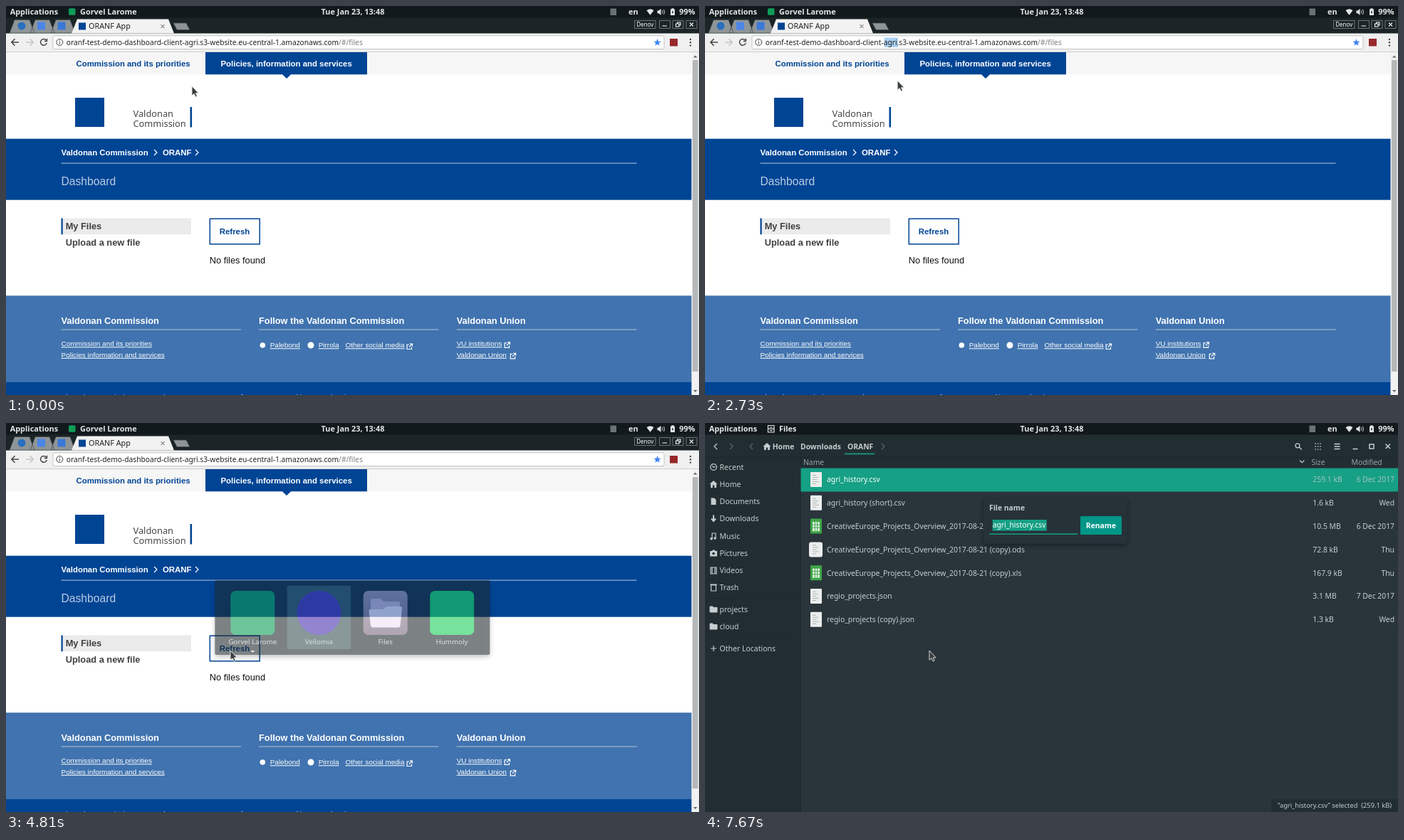
These frames come from a looping animation (973x547 px, 8 s). An HTML page:

```html
<!DOCTYPE html>
<html lang="en">
<head>
<meta charset="utf-8">
<title>Dashboard demo</title>
<style>
html, body { margin: 0; width: 100%; height: 100%; overflow: hidden; background: #29353b; }
svg { display: block; width: 973px; height: 547px; }
text { white-space: pre; }
.ui { font: 10.35px "Noto Sans", sans-serif; fill: #c6cdcf; }
.bold { font-weight: 700; }
.panel { font-size: 10.9px; font-weight: 700; fill: #e3e6e6; }
.web { font: 9.97px "Liberation Sans", Arial, sans-serif; fill: #fff; }
.nav { font-size: 11.4px; font-weight: 700; }
.head { font-size: 12.82px; font-weight: 700; }
.link { text-decoration: underline; }
.blue { fill: #004494; }
.line { fill: none; stroke-width: 1.2; }
.mid { text-anchor: middle; }
.end { text-anchor: end; }
</style>
</head>
<body>
<svg viewBox="0 0 973 547">
<defs>
  <linearGradient id="tile" x2="0" y2="1"><stop stop-color="#a08fa5"/><stop offset="1" stop-color="#7c6c80"/></linearGradient>
  <filter id="shadow" x="-10%" y="-20%" width="120%" height="150%"><feDropShadow dx="0" dy="3" stdDeviation="3.5" flood-opacity=".4"/></filter>
  <g id="out" class="line" stroke="#fff"><path d="M3.5 1.5H.6V8H7V5M4.5.6H8V4M8 .6L3.4 5"/></g>
  <path id="chevron" class="line" d="M0 0L4 4L0 8"/>
  <path id="folder" d="M0 1.5Q0 .5 1 .5H4L5.5 2H10Q11 2 11 3V8.5Q11 9.5 10 9.5H1Q0 9.5 0 8.5Z"/>
  <path id="house" d="M5.5 0L11 5H9.5V10H6.7V6.5H4.3V10H1.5V5H0Z"/>
</defs>

<g id="browser">
  <!-- page -->
  <rect width="973" height="547" fill="#fff"/>
  <g id="page" class="web">
    <rect x="-10" y="64.8" width="1000" height="31.5" fill="#f6f6f6"/>
    <path class="blue" d="M280 64.8H507V96.3H400L394 102L388 96.3H280Z"/>
    <text class="nav blue" x="98.5" y="84.8">Commission and its priorities</text>
    <text class="nav" x="301.5" y="84.8">Policies, information and services</text>
    <rect class="blue" x="97" y="129" width="41" height="41"/>
    <g style="font: 500 12.8px 'Noto Sans', sans-serif" fill="#454649">
      <text x="178.5" y="156">Valdonan</text><text x="178.5" y="169.8">Commission</text>
    </g>
    <rect x="258.5" y="142" width="2.6" height="28.5" class="blue"/>
    <rect class="blue" x="-10" y="186.7" width="1000" height="86"/>
    <text class="nav" x="77.5" y="210">Valdonan Commission</text>
    <text class="nav" x="220" y="210">ORANF</text>
    <g stroke="#fff" stroke-width="1.6"><use href="#chevron" x="208" y="202"/><use href="#chevron" x="266" y="202"/></g>
    <rect x="77.5" y="220.6" width="808" height="1" fill="#b3c7df"/>
    <text x="77.5" y="252" style="font-size: 15.67px" fill="#b9cbe2">Dashboard</text>
    <rect x="77.5" y="298.5" width="182.5" height="22.7" fill="#ebebeb"/>
    <rect class="blue" x="77.5" y="298.5" width="2.2" height="22.7"/>
    <g class="head" fill="#404040"><text x="83.7" y="314.3">My Files</text><text x="83.7" y="337">Upload a new file</text></g>
    <g id="result">
      <rect id="button" x="286.3" y="299.2" width="69.9" height="35.6"/>
      <text id="refresh" class="nav mid" x="321" y="321.3">Refresh</text>
      <text x="285.7" y="362.3" style="font-size: 12.82px" fill="#111">No files found</text>
    </g>
  </g>
  <g id="spinner" fill="none" stroke="#004494" stroke-width="1.6">
    <path d="M3.6 -4.8A6 6 0 1 1 -3.6 -4.8"/><path d="M-6.6 -5.6H-2.6V-1.6"/>
  </g>
  <g id="footer" class="web">
    <rect x="-10" y="407.3" width="1000" height="121.5" fill="#4073af"/>
    <rect x="-10" y="528.6" width="1000" height="60" class="blue"/>
    <g class="head">
      <text x="77.5" y="447.3">Valdonan Commission</text>
      <text x="355" y="447.3">Follow the Valdonan Commission</text>
      <text x="632.7" y="447.3">Valdonan Union</text>
    </g>
    <path d="M77.5 455H330M355 455H607.5M632.7 455H885.5" stroke="#b3c7df"/>
    <g class="link">
      <text x="77.5" y="478.3">Commission and its priorities</text>
      <text x="77.5" y="493.8">Policies information and services</text>
      <text x="370.7" y="480.3">Palebond</text>
      <text x="438.7" y="480.3">Pirrola</text>
      <text x="476.5" y="480.3">Other social media</text>
      <text x="632.7" y="478.3">VU institutions</text>
      <text x="632.7" y="493.8">Valdonan Union</text>
      <text x="77.5" y="552.8">About the Commission's new web presence</text>
      <text x="279.3" y="552.8">Resources for partners</text>
      <text x="389.5" y="552.8">Cookies</text>
      <text x="433.8" y="552.8">Legal notice</text>
      <text x="496.5" y="552.8">Contact</text>
    </g>
    <circle cx="360.3" cy="477" r="3.8"/><circle cx="428" cy="477" r="4.5"/>
    <use href="#out" x="562.5" y="474.5"/><use href="#out" x="699.5" y="472.3"/><use href="#out" x="707.7" y="487.8"/>
  </g>
  <g id="scrollbar">
    <rect x="962.5" y="65" width="10.5" height="482" fill="#f1f1f1"/>
    <rect x="964" y="76" width="7.6" height="438" fill="#b5b7b8"/>
    <path d="M965 72.5L967.8 69.5L970.6 72.5ZM965 540L967.8 543L970.6 540Z" fill="#666"/>
  </g>

  <!-- tabs and address bar -->
  <rect y="16" width="973" height="23" fill="#1b2427"/>
  <g fill="#8f9597" stroke="#40484b" stroke-width=".7">
    <path d="M5 38L12 19.5H33L40 38ZM34 38L41 19.5H61L68 38ZM63 38L70 19.5H90L97 38Z"/>
    <path d="M235 24H253L258 33.5H240Z"/>
  </g>
  <path d="M92 38.5L100 18.5H228L236 38.5Z" fill="#f2f2f2"/>
  <circle cx="22" cy="28" r="5.5" fill="#2a6fc0"/>
  <rect x="44" y="22.5" width="11" height="11" fill="#4a86e8"/>
  <rect x="72.5" y="22.5" width="11" height="11" fill="#3a78d8"/>
  <rect x="102" y="23.5" width="10" height="10" class="blue"/>
  <text class="ui" x="116" y="32.2" style="font-size: 10.8px; fill: #222">ORANF App</text>
  <path d="M217.5 26L222.5 31M222.5 26L217.5 31" stroke="#555"/>
  <rect y="38.5" width="973" height="26.3" fill="#f0f0f0"/>
  <rect y="64" width="973" height=".8" fill="#c8c8c8"/>
  <rect x="66" y="41.8" width="858" height="18.8" rx="2" fill="#fff" stroke="#b4b6b7" stroke-width=".8"/>
  <g class="line" stroke="#444" style="stroke-width: 1.5">
    <path d="M18 51H8M12.5 46.2L7.8 51L12.5 55.8"/>
    <path d="M28 51H38M33.5 46.2L38.2 51L33.5 55.8" stroke="#c3c5c6"/>
    <path d="M56.3 48A4.4 4.4 0 1 0 57.2 52M57.4 45.8V49.4H53.8"/>
    <path d="M75.3 50.3V53.8M75.3 48V49.2" stroke-width="1"/><circle cx="75.3" cy="51" r="4.5" stroke-width="1"/>
  </g>
  <rect id="mark" y="44.5" height="13.5" fill="#abd1f3"/>
  <text class="ui" x="84.7" y="54.8" style="font-size: 10.24px; fill: #222">oranf-test-demo-dashboard-client-agri.s3-website.eu-central-1.amazonaws.com<tspan fill="#808080">/#/files</tspan></text>
  <path id="star" fill="#4285f4"/>
  <rect x="932" y="46" width="11" height="10.5" fill="#97282a"/>
  <g fill="#444"><circle cx="961" cy="47" r="1.2"/><circle cx="961" cy="51.3" r="1.2"/><circle cx="961" cy="55.6" r="1.2"/></g>
  <g class="line" stroke="#858b8d" style="stroke-width: .8">
    <path d="M882.5 20.5H912V31.5H882.5ZM917.5 20.5H932.5V31.5H917.5ZM936 20.5H951V31.5H936ZM955 20.5H970V31.5H955Z"/>
    <path d="M921.5 28H928M940.5 25H945V29H940.5ZM942.5 25V23H947V27H945M960 23.5L965 28.5M965 23.5L960 28.5" stroke="#fff" stroke-width="1.1"/>
  </g>
  <text class="ui mid" x="897.3" y="28.8" style="font-size: 8px; fill: #fff">Denov</text>
</g>

<g id="files" class="ui">
  <rect width="973" height="547" fill="#29353b"/>
  <path d="M0 16H973V63.5H134.5V547H0Z" fill="#222d32"/>
  <path d="M0 48H973M134.5 48V547M0 246.5H134M0 301.5H134" stroke="#1d272b" stroke-width=".8"/>
  <g stroke="#c6cdcf">
    <path class="line" d="M17 29L13 33L17 37"/>
    <g opacity=".35"><use href="#chevron" x="35" y="29"/><path class="line" d="M67 29L63 33L67 37"/><use href="#chevron" x="248" y="29"/></g>
    <path class="line" d="M835 52.5L838.2 55.7L841.4 52.5"/>
    <circle class="line" cx="832" cy="31.8" r="3"/>
    <path class="line" d="M834.3 34L838 37.5"/>
    <path class="line" d="M856 29H865M856 33H865M856 37H865" stroke-dasharray="2 1.5"/>
    <path class="line" style="stroke-width: 1.5" d="M883.5 29.5H891.5M883.5 33H891.5M883.5 36.5H891.5M909.5 36.5H916.5M933 30H939V36H933ZM955.5 29.5L962 36M962 29.5L955.5 36"/>
  </g>
  <use href="#house" x="81.5" y="28"/>
  <g class="bold"><text x="94.7" y="36.7">Home</text><text x="134" y="36.7">Downloads</text><text x="200" y="36.7">ORANF</text></g>
  <rect x="196" y="42.6" width="42" height="1.6" fill="#16a085"/>
  <g fill="#98a2a5"><text x="138" y="59.2">Name</text><text x="851.5" y="59.2">Size</text><text x="907.5" y="59.2">Modified</text></g>
  <rect x="134.5" y="63.5" width="838.5" height="33" fill="#16a085"/>
  <g id="rows"></g>
  <g id="places" style="font-size: 10.5px; font-weight: 500"></g>
  <g class="line" stroke="#c6cdcf">
    <circle cx="12" cy="62" r="4.3"/><path d="M10 60L12 62.5L14.5 61"/>
    <path d="M12 129.5V137M9 134.5L12 138L15 134.5" stroke-width="2"/>
    <path d="M10 163V155H15V162"/><path d="M8 203H16V212H8ZM10 203V212M14 203V212"/>
    <path d="M8.5 228H15.5V236H8.5ZM7 227H17"/><path d="M8 317H16M12 313V321"/>
  </g>
  <path d="M8.5 105.5H13L15.5 108V115H8.5ZM7 180H10L11 178.5H13.5L14.5 180H17V187.5H7Z"/>
  <circle cx="12" cy="183.5" r="1.8" fill="#222d32"/>
  <circle cx="9" cy="162.8" r="1.8"/><circle cx="14" cy="162" r="1.8"/>
  <use href="#house" x="6.5" y="81"/><use href="#folder" x="6.5" y="257"/><use href="#folder" x="6.5" y="281"/>
  <rect x="795" y="529" width="178" height="18" fill="#222d32"/>
  <text class="end" x="964" y="541.3" style="font-size: 9.3px">“agri_history.csv” selected  (259.1 kB)</text>
  <g id="rename">
    <rect x="391" y="105" width="202" height="64.5" rx="2" fill="#263238" filter="url(#shadow)"/>
    <text class="bold" x="399" y="123">File name</text>
    <rect x="399" y="155.4" width="124" height="1.5" fill="#16a085"/>
    <rect id="chosen" x="403.7" y="136" height="15.5" fill="#16a085"/>
    <text x="403.7" y="147.4" fill="#fff">agri_history.csv</text>
    <rect x="527" y="131" width="58" height="26" rx="1.5" fill="#009688"/>
    <text class="bold mid" x="556" y="147.6" fill="#fff">Rename</text>
  </g>
</g>

<!-- desktop panel -->
<rect width="973" height="16.5" fill="#12191c"/>
<g class="ui panel">
  <text x="5.7" y="11.7">Applications</text>
  <text id="app" x="104" y="11.7"></text>
  <text class="mid" x="487" y="11.7">Tue Jan 23, 13:48</text>
  <text x="874" y="11.7">en</text>
  <text class="end" x="967.5" y="11.7">99%</text>
</g>
<rect id="appIcon" x="88" y="3.3" width="9.5" height="9.5" rx="1.5" fill="#0f9d58"/>
<path id="drawer" class="line" d="M88.5 3.5H97V13H88.5ZM88.5 8.2H97M91 6H94.5M91 10.6H94.5" stroke="#e3e6e6"/>
<rect x="848.5" y="3.5" width="8.5" height="9.5" fill="#6b7274"/>
<path d="M899.5 6.2Q904.5 2.5 909.5 6.2L904.5 12.7ZM914.5 6.5H916.5L919.5 3.7V13L916.5 10.2H914.5ZM933 4.5H934.5V3.3H937.5V4.5H939V13H933Z" fill="#e3e6e6"/>
<path class="line" d="M921.3 6Q922.7 8.3 921.3 10.6M923.3 4.7Q925.6 8.3 923.3 12" stroke="#a8adae"/>
<path d="M935 8.7H937M936 7.2V10.2" stroke="#12191c"/>

<g id="switcher">
  <rect x="293.3" y="221.3" width="386" height="104.7" rx="2" fill="#202a2e" fill-opacity=".94" filter="url(#shadow)"/>
  <rect id="pick" y="228.7" width="89.5" height="89.3" rx="1.5" fill="#3b5658"/>
  <rect x="315.3" y="236" width="62" height="62" rx="7" fill="#0f9d58"/>
  <circle cx="439.4" cy="267" r="31" fill="#4c34b0"/>
  <rect x="501.7" y="236" width="62" height="62" rx="7" fill="url(#tile)"/>
  <path d="M512 250Q512 247 515 247H526L530 251H550Q553 251 553 254V268H512Z" fill="#c9b5cf"/>
  <path d="M509.5 265Q509.5 262 512 262H530L534 258H553.5Q556 258 556 261L553.5 285Q553 287.5 550.5 287.5H515Q512.5 287.5 512 285Z" fill="#f0e3f4"/>
  <rect x="595.2" y="236" width="62" height="62" rx="7" fill="#1ed05c"/>
  <g class="ui mid" style="font-size: 9.8px">
    <text x="346.3" y="310.5">Gorvel Larome</text><text x="439.4" y="310.5">Vellomia</text>
    <text x="532.7" y="310.5">Files</text><text x="626" y="310.5">Hummoly</text>
  </g>
  <path d="M343.3 320H349.3L346.3 323Z" fill="#d5dadb"/>
</g>
<path id="cursor" d="M0 0V13.3L3 10.8L5.2 15L7.3 14L5.3 9.9H9.2Z" fill="#3a3e40" stroke="#e6e8e8" stroke-width=".9"/>
</svg>

<script>
const $ = id => document.getElementById(id);
const set = (id, attrs) => { for (const k in attrs) $(id).setAttribute(k, attrs[k]); };
const show = (id, alpha) => { $(id).style.opacity = +alpha; };

const star = Array.from({ length: 10 }, (_, i) => {
  const a = i * Math.PI / 5, r = i % 2 ? 2.3 : 5.4;
  return `${914.5 + r * Math.sin(a)} ${51.5 - r * Math.cos(a)}`;
});
set('star', { d: `M${star.join('L')}Z` });

const overview = 'CreativeEurope_Projects_Overview_2017-08-21';
const rows = [
  ['agri_history.csv', '259.1 kB', '6 Dec 2017'],
  ['agri_history (short).csv', '1.6 kB', 'Wed'],
  [overview + '.xls', '10.5 MB', '6 Dec 2017'],
  [overview + ' (copy).ods', '72.8 kB', 'Thu'],
  [overview + ' (copy).xls', '167.9 kB', 'Thu'],
  ['regio_projects.json', '3.1 MB', '7 Dec 2017'],
  ['regio_projects (copy).json', '1.3 kB', 'Wed']
];
function fileIcon(name, y) {
  const sheet = name.endsWith('xls'), ods = name.endsWith('ods');
  const page = `<rect x="${ods ? 146 : 148}" y="${y - 10.5}" width="${ods ? 19 : 16}" height="21" rx="${ods ? 3 : 1}" fill="${sheet ? '#3fa648' : '#eceeee'}"/>`;
  const inner = sheet
    ? `<rect x="151" y="${y - 6}" width="10" height="13" fill="#e2f1e2"/><path d="M151 ${y - 2}h10m-10 4h10M154.3 ${y - 6}v13m3.4 -13v13" stroke="#3fa648"/>`
    : `<path d="M151 ${y - 6}h5m-5 3h8m-8 3h6m-6 3h9m-9 3h5" stroke="#a9b3ad" stroke-width=".9"/>`;
  return page + inner;
}
$('rows').innerHTML = rows.map(([name, size, date], i) => {
  const y = 79.5 + 32.8 * i, base = y + 3.8;
  return fileIcon(name, y) + `<text x="171" y="${base}" fill="${i ? '' : '#fff'}">${name}</text>
    <g opacity="${i ? 1 : .8}"><text x="853.3" y="${base}">${size}</text><text class="end" x="968" y="${base}">${date}</text></g>`;
}).join('');

const places = ['Recent', 'Home', 'Documents', 'Downloads', 'Music', 'Pictures', 'Videos', 'Trash', 'projects', 'cloud', 'Other Locations'];
$('places').innerHTML = places.map((name, i) => {
  const y = 65.8 + 24.2 * i + (i > 7) * 6.5 + (i > 9) * 6.5;
  return `<text x="20.5" y="${y}">${name}</text>`;
}).join('');

// [time, x, y] of the pointer tip
const path = [[0, 261, 112.7], [130, 261, 111], [780, 262, 70], [1040, 259, 51], [2600, 259, 51], [3250, 315, 320], [8000, 315, 320]];
function pointer(t) {
  const i = path.findIndex(p => p[0] > t), [t0, x0, y0] = path[i - 1], [t1, x1, y1] = path[i];
  const k = (t - t0) / (t1 - t0);
  return `translate(${x0 + (x1 - x0) * k} ${y0 + (y1 - y0) * k})`;
}

function draw(now) {
  const t = Math.floor(now % 8000 / 130) * 130;
  const between = (a, b) => t >= a && t < b;
  const loading = between(3510, 4420), hover = between(3250, 3510), focus = between(3380, 3510);
  const inFiles = t >= 5850, dx = loading ? 5.4 : 0;

  show('browser', !inFiles);
  show('files', inFiles);
  show('drawer', inFiles);
  show('appIcon', !inFiles);
  $('app').textContent = inFiles ? 'Files' : 'Gorvel Larome';

  set('page', { transform: `translate(${dx} 0)` });
  set('footer', { transform: `translate(${dx} ${loading ? -24.8 : 0})` });
  show('result', !loading);
  show('scrollbar', !loading);
  show('spinner', loading);
  set('spinner', { transform: `translate(590.7 318.3) rotate(${(t - 4160) * .18})` });
  set('button', { fill: hover ? '#004494' : '#fff', stroke: focus ? '#ffd617' : '#004494', 'stroke-width': focus ? 2.2 : 1.5 });
  set('refresh', { fill: hover ? '#fff' : '#004494', 'text-decoration': hover ? 'underline' : 'none' });

  const all = between(1170, 1430), word = between(1430, 3380);
  set('mark', { x: all ? 84.7 : 251.8, width: all ? 417 : word ? 19.2 : 0 });

  show('switcher', t < 4810 ? 0 : t < 4940 ? .6 : t < 5850 ? 1 : t < 5980 ? .06 : 0);
  set('pick', { x: t < 5070 ? 394.7 : 488.3 });
  show('rename', Math.max(0, Math.min(1, (t - 6630) / 390)));
  set('chosen', { width: t < 7410 ? 57.5 : 76 });
  set('cursor', { transform: pointer(t) });
}
function loop(now) {
  draw(now);
  requestAnimationFrame(loop);
}
draw(0);
requestAnimationFrame(loop);
</script>
</body>
</html>
```
